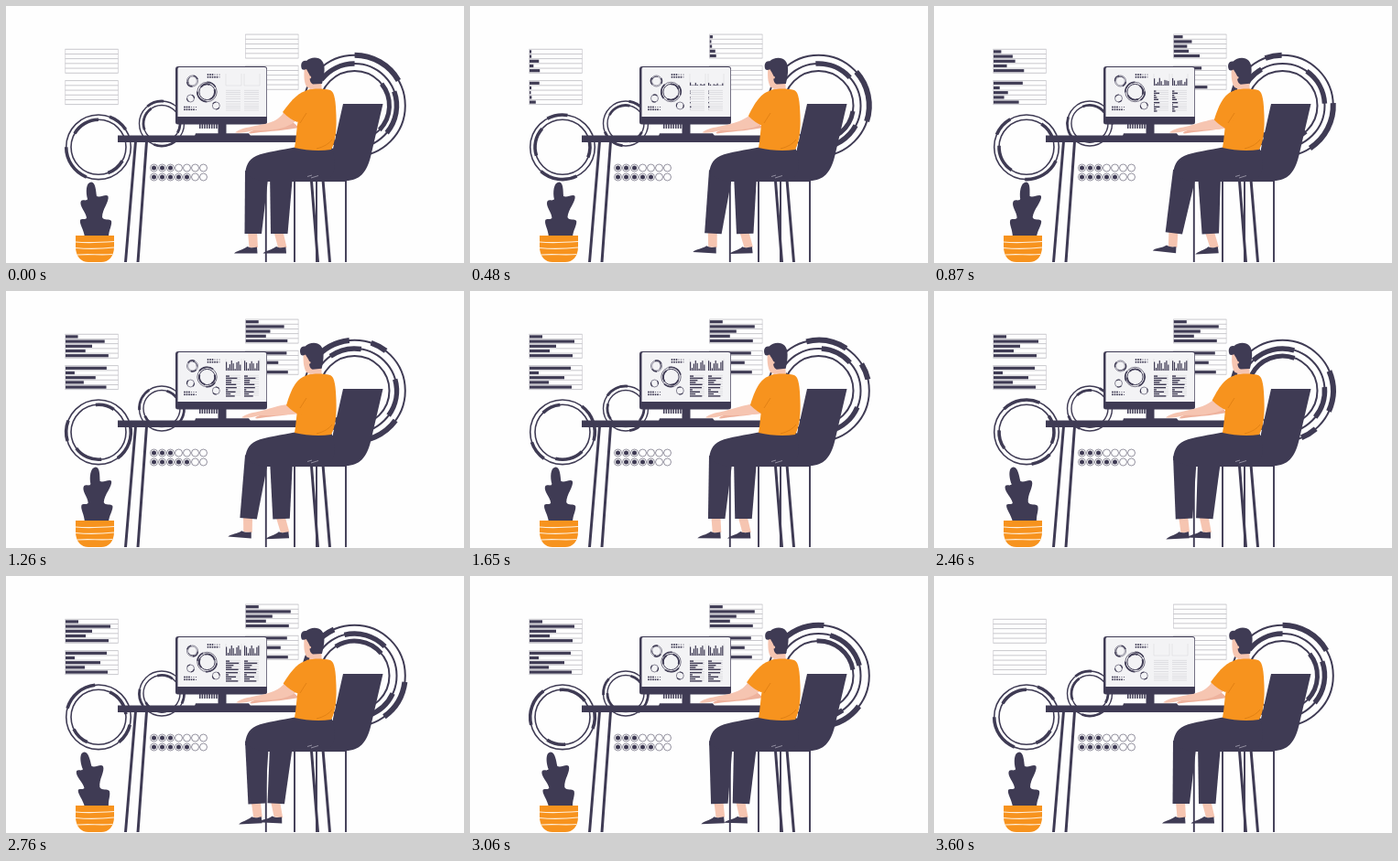
These frames come from a looping animation (500 px wide and 281 px high, 3.63 s). An HTML page with a canvas:

```html
<!DOCTYPE html>
<html lang="en">
<head>
<meta charset="utf-8">
<title>Desk work</title>
<style>
html, body { margin: 0; width: 500px; height: 281px; overflow: hidden; background: #fefefe; }
canvas { display: block; }
</style>
</head>
<body>
<canvas id="stage" width="500" height="281"></canvas>
<script>
const ctx = document.getElementById('stage').getContext('2d');
// the cycle ends on its opening pose, held for the rest of the loop
const LOOP = 3630, CYCLE = 3600, GROW = 1200;
const DARK = '#3f3b54', ORANGE = '#f7931e', SKIN = '#f6c5b1', GRAY = '#c3c2c8', PAPER = '#fefefe';
const rad = deg => deg * Math.PI / 180;
const smooth = x => { x = Math.min(1, Math.max(0, x)); return x * x * (3 - 2 * x); };
const mix = (a, b, k) => a + (b - a) * k;

function shape(d, color) {
  ctx.fillStyle = color;
  ctx.fill(new Path2D(d));
}
function stroke(d, color, width) {
  ctx.strokeStyle = color;
  ctx.lineWidth = width;
  ctx.stroke(new Path2D(d));
}
function box(x, y, w, h, color) {
  ctx.fillStyle = color;
  ctx.fillRect(x, y, w, h);
}
function arc(x, y, r, width, from = 0, to = 360) {
  ctx.strokeStyle = DARK;
  ctx.lineWidth = width;
  ctx.beginPath();
  ctx.arc(x, y, r, rad(from), rad(to));
  ctx.stroke();
}
function dot(x, y, r, color = DARK) {
  ctx.fillStyle = color;
  ctx.beginPath();
  ctx.arc(x, y, r, 0, 7);
  ctx.fill();
}
function pose(x, y, draw, { turn = 0, skew = 0 }) {
  ctx.save();
  ctx.translate(x, y);
  ctx.rotate(rad(turn));
  ctx.transform(1, 0, skew, 1, 0, 0);
  ctx.translate(-x, -y);
  draw();
  ctx.restore();
}

// rings: [radius, thin width, thick width, from, to, from, to, ...]
function dial(x, y, angle, rings) {
  for (const [r, thin, thick, ...ends] of rings) {
    arc(x, y, r, thin);
    for (let i = 0; i < ends.length; i += 2)
      arc(x, y, r, thick, ends[i] + angle, ends[i + 1] + angle);
  }
}

// rows: [full width, delay]
function barPanel(x, y, t, rows) {
  box(x, y, 58, 26, PAPER);
  for (let i = 0; i <= 5; i++) box(x, y + i * 5.2 - .4, 58, .9, GRAY);
  box(x, y, .6, 26, GRAY);
  box(x + 57.5, y, .6, 26, GRAY);
  rows.forEach(([w, delay], i) =>
    box(x + .5, y + 1.1 + i * 5.2, w * smooth((t - delay) / GROW), 3.2, DARK));
}

const WIDTHS_A = [14, 49, 29, 22, 47], WIDTHS_B = [45, 10, 38, 21, 46];
const rows = (widths, ...delays) => widths.map((w, i) => [w, delays[i]]);
const PANELS = [
  [64.5, 47.2, rows(WIDTHS_A, 190, 330, 0, 140, 100)],
  [64.5, 81.6, rows(WIDTHS_B, 100, 130, 340, 230, 190)],
  [261.3, 31, rows(WIDTHS_A, 110, 350, 270, 70, 190)],
  [261.3, 65.2, rows(WIDTHS_B, 130, 130, 250, 100, 20)]
];

function indicators() {
  [[177, 3], [187, 5]].forEach(([y, filled]) => {
    for (let i = 0; i < 7; i++) {
      const x = 161.5 + i * 9;
      arc(x, y, 4, .55);
      if (i < filled) dot(x, y, 2.5);
    }
  });
}

function screenCharts(t) {
  for (let p = 0; p < 2; p++) {
    const x = 240 + p * 20;
    stroke(`M${x} 74V87H${x + 17}V74`, '#d5d5da', .5);
    for (let i = 0; i < 9; i++) {
      const h = 1.5 + 9.5 * Math.abs(Math.sin(i * 2.3 + p * .8 + 1));
      const k = smooth((t - (i * 137 + p * 60) % 350) / GROW);
      box(x + i * 1.9, 87 - h * k, 1.2, h * k, DARK);
    }
    for (let g = 0; g < 2; g++) for (let i = 0; i < 5; i++) {
      const y = 92.4 + g * 12.6 + i * 2.3;
      const w = (g ? WIDTHS_B : WIDTHS_A)[i] * .29;
      box(x, y - .5, 16, .5, '#c9c8ce');
      box(x, y, w * smooth((t - 200 - (i * 130 + g * 90) % 340) / GROW), 1.4, DARK);
    }
  }
}

function monitor(t, angle) {
  shape('M188 66H282Q285 66 285 69V127Q285 129.500 282 129.500H188Q185 129.500 185 127V69Q185 66 188 66Z', DARK);
  shape('M189 67H282Q284.300 67 284.300 69V121H187.500V69Q187.500 67 189 67Z', '#f3f3f5');
  dial(203.5, 82, angle, [[6, .6, 1.4, -80, -20, 90, 170], [4.8, .4, .8, 150, 240]]);
  dial(201.5, 101, -angle, [[4, .6, 1.1, -70, 0, 120, 180]]);
  dial(219.5, 94, angle, [[10.7, .7, 1.6, -90, -30, 91, 182], [8.6, 1, 1.9, -142, -70, -20, 70]]);
  dial(229.3, 109, -angle, [[4, .6, 1.1, -150, -90, 30, 90]]);
  for (let r = 0; r < 2; r++) for (let i = 0; i < 6; i++) {
    dot(220.5 + i * 2.5, 75 + r * 2.8, i < 3 + 2 * r ? .95 : .55);
    dot(195 + i * 2.5, 110.5 + r * 2.8, i < 3 + 2 * r ? .95 : .55);
  }
  screenCharts(t);
  box(231.5, 129, 9, 11, DARK);
  shape('M207 139.200H265L267 142H206Z', DARK);
  for (let i = 0; i < 8; i++) box(211 + i * 2.6, 129, 1.5, 5, DARK);
}

function furniture() {
  box(122, 141.5, 225, 7.5, DARK);
  stroke('M141.500 148L130.500 280M153.500 148L144 280M331 160L340.500 280M343.500 160L353.500 280', DARK, 3);
  stroke('M283.800 190V280M315 190V280M371 190V280M339 190V280', DARK, 1.9);
}

function plant(sway) {
  pose(99, 252, () => shape('M86 253C85 244 80 239 81 234C82 232 86 234 88 232C88 226 79 218 82 213C84 211 88 214 89 211C87 204 87 193 93 192.500C98 193 98 202 99 208C103 210 109 205 111.500 208C113 214 105 222 105 231C107 235 113 232 115 235C116 240 112 245 112 253Z', DARK),
    { skew: -sway * .127 });
  shape('M76 251H118V263C118 274 112 280 104 280H90C82 280 76 274 76 263Z', ORANGE);
  stroke('M76 258C90 259.500 104 258.500 118 257.500M76 264.500C90 266 104 265.500 118 264M78 272C90 271 104 272.500 116 271.500', '#fff0dc', 1.1);
}

function shin(x, w, dx, inner, outer) {
  shape(`M${x + 3.5} 247H${x + 13.5}L${x + 14.5 + dx} 264H${x + 5 + dx}Z`, SKIN);
  shape(`M${x - 11.5 + dx} 270.500C${x - 8 + dx} 267 ${x - 2 + dx} 267 ${x + 3 + dx} 263C${x + 7 + dx} 265 ${x + 10 + dx} 264 ${x + 13.5 + dx} 263.500L${x + 14 + dx} 270.500Z`, DARK);
  shape(`M${x} 249H${x + w}L${x + w + outer} 185L${x + inner} 180Z`, DARK);
}

function legs(sway) {
  pose(302, 185, () => shin(289, 18.5, 3, -1, 5.5), { turn: -3.2 * sway });
  pose(271, 180, () => shin(260.5, 18.5, 0, .5, 7.5), { turn: (sway > 0 ? 6.6 : 3.3) * sway });
  shape('M318 154C300 158 284 159 273 164C264 168 261.500 176 261 185L281 192H345C360 190 362 170 355 155Z', DARK);
}

function chair() {
  shape('M368 107H411.500L398.500 163C394 182 386 191 371 191H312V189H340C350 186 356 172 357 156Z', DARK);
  box(312, 190.3, 60, 1.8, DARK);
}

function body(reach) {
  const hand = mix(250, 257, reach), elbowX = mix(302, 306, reach), elbowY = mix(116, 125, reach);
  // far arm
  shape(`M${hand + 15} 139C${hand + 20} 134 ${hand + 30} 134 312 126L320 133C300 137 ${hand + 30} 137 ${hand + 17} 139.500Z`, '#eeb29d');
  // neck
  shape('M332 82L344 80L345 94H331Z', SKIN);
  // near arm
  shape(`M${hand} 138.500C${hand + 5} 134 ${hand + 13} 133 ${hand + 22} 131C290 128 298 125 ${elbowX + 2} ${elbowY - 1}L${elbowX + 15} ${elbowY + 9}C305 136 288 136 ${hand + 21} 136C${hand + 13} 138 ${hand + 6} 139 ${hand} 138.500Z`, SKIN);
  shape('M328 92C336 90 346 90 354 92C359 94 360 105 360.500 120C361 135 360 148 355 157C342 159 328 158 315 155C317 144 317 134 319 124Z', ORANGE);
  shape(`M330 92C320 94 313 101 ${elbowX} ${elbowY}Q${elbowX + 8} ${elbowY + 8} ${elbowX + 16} ${elbowY + 11}L330 117Z`, ORANGE);
  stroke('M321 128L328 117M339 156Q351 153 356 146', '#dc7d12', .8);
}

function head(reach) {
  pose(340, 92, () => {
    shape('M326 66C325 74 325 83 328 88C331 91 336 90 338 86L340 66Z', SKIN);
    shape('M323 69C321 64 323 59 328 60C332 56 341 55 345 60C349 65 348 74 345 85L335 85.500C332 84 331 80 332 77C331 74 329 71 328 69C326 70 324 70 323 69Z', DARK);
    dot(331.8, 78, 1.4, SKIN);
  }, { turn: -2.6 * reach });
}

// eased swing: 0, 1, 0, -1, 0
function swing(t) {
  const q = t / CYCLE * 4, step = Math.floor(q), keys = [0, 1, 0, -1, 0];
  return mix(keys[step], keys[step + 1], smooth(q - step));
}

function draw(t) {
  const angle = t / CYCLE * 360;
  const sway = swing(t);
  const reach = smooth(t / 1000) - smooth((t - 1500) / 1700);
  box(0, 0, 500, 281, PAPER);
  PANELS.forEach(([x, y, list]) => barPanel(x, y, t, list));
  dial(380.5, 109, angle, [
    [55.3, 2, 6, -90, -30, 91, 138, 163, 182],
    [46, 2, 5.5, -142, -90, -20, 40, 109, 153],
    [38, 2, 5, -39, 44]
  ]);
  dial(101, 154.3, -angle, [
    [35.3, 1.6, 3.6, -70, -33, 112, 180],
    [30, 1.6, 3.6, -150, -90, 30, 70]
  ]);
  dial(170, 128.5, angle, [
    [24.5, 1.4, 2.8, -130, -85, 50, 110],
    [20, 1.4, 2.8, 160, 235, -20, 30]
  ]);
  indicators();
  furniture();
  monitor(t, angle);
  plant(sway);
  chair();
  legs(sway);
  stroke('M329 186.500L334 185M333 188L341 185.500', '#c9c7d2', .6);
  body(reach);
  head(reach);
}

const start = performance.now();
function tick() {
  draw((performance.now() - start) % LOOP % CYCLE);
  requestAnimationFrame(tick);
}
tick();
</script>
</body>
</html>
```
